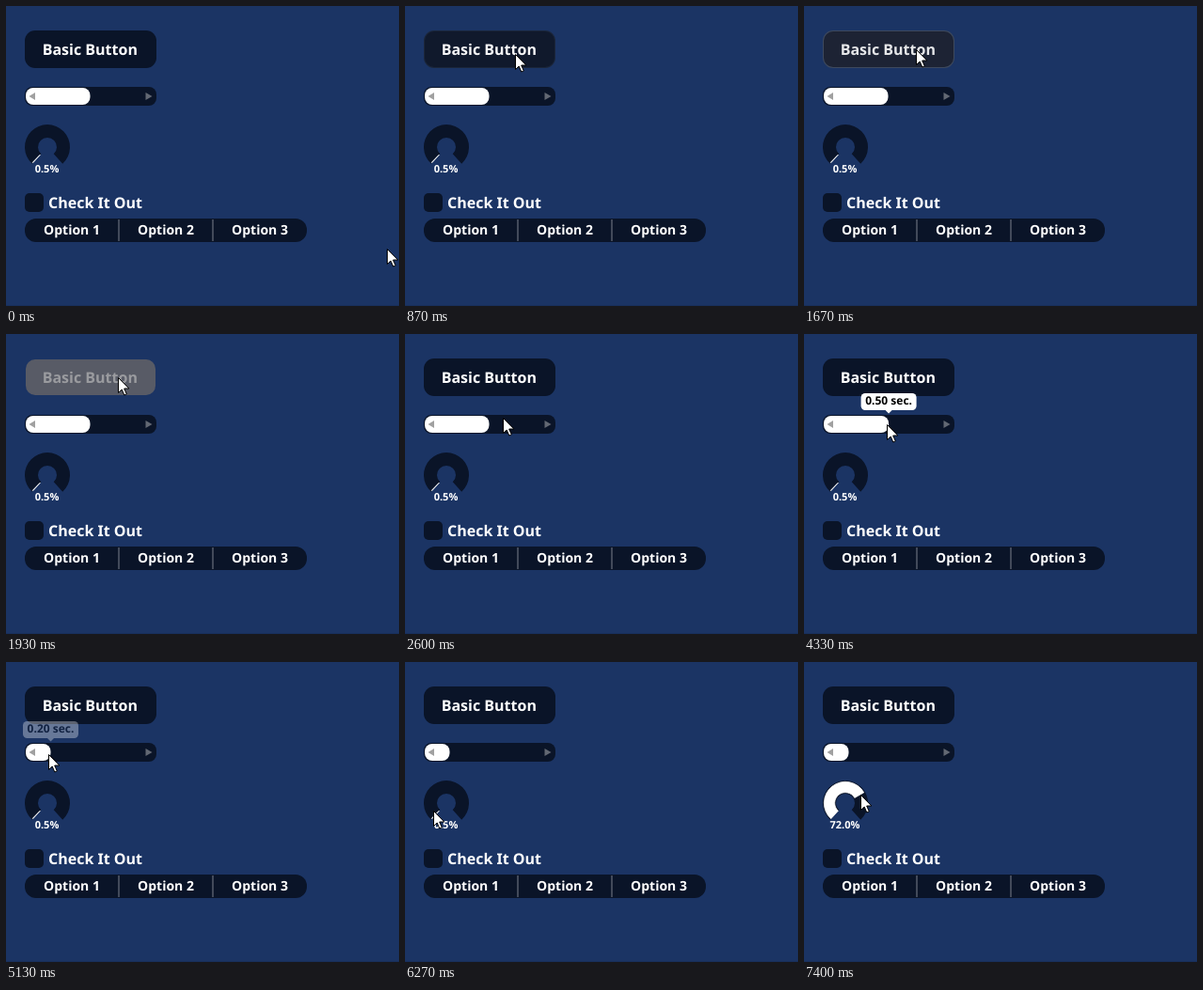
An HTML page for the animation above (8 s loop, 418x319 px).

```html
<!DOCTYPE html>
<html lang="en">
<head>
<meta charset="utf-8">
<title>Widget demo</title>
<style>
  html, body { margin: 0; width: 100%; height: 100%; overflow: hidden; background: #1b3464; }
  svg { display: block; width: 418px; height: 319px; }
  text { font: 700 16px "Noto Sans", "Open Sans", sans-serif; fill: #fff; text-rendering: geometricPrecision; }
  .mid { text-anchor: middle; }
  .dark { fill: #0a1428; }
  .tab { font-size: 14px; }
  .percent { font-size: 11px; }
  .tip { font-size: 12px; fill: #000; }
</style>
</head>
<body>
<svg viewBox="0 0 418 319">
  <rect width="418" height="319" fill="#1b3464"/>
  <rect y="318" width="418" height="1" fill="#182f5b"/>

  <rect id="edge" x="20" y="26" width="140" height="40" rx="11"/>
  <rect id="face" x="21" y="27" width="138" height="38" rx="10"/>
  <text id="label" class="mid" x="89.3" y="52">Basic Button</text>

  <rect class="dark" x="20" y="86" width="140" height="20" rx="8"/>
  <rect id="fill" x="21" y="87" height="18" rx="8" fill="#fff"/>
  <path d="M24.5 96l6.5-4v8z" fill="#a0a0a0"/>
  <path d="M155.5 96l-7-4v8z" fill="#626873"/>

  <path id="ring" class="dark"/>
  <path id="arc" fill="#fff" stroke="#fff" stroke-width=".7"/>
  <text id="percent" class="percent mid" x="43.5" y="177"></text>

  <rect class="dark" x="20" y="199" width="20" height="20" rx="5"/>
  <text x="45" y="215">Check It Out</text>

  <rect class="dark" x="20" y="226" width="300" height="25" rx="12"/>
  <path d="M120 227v23M220 227v23" stroke="#7a808c"/>
  <text class="tab mid" x="70" y="243">Option 1</text>
  <text class="tab mid" x="170" y="243">Option 2</text>
  <text class="tab mid" x="270" y="243">Option 3</text>

  <g id="bubble">
    <rect x="-29.5" y="63" width="59" height="18" rx="4.5" fill="#fff"/>
    <path d="M-3.500 81h7L0 84.500z" fill="#fff"/>
    <text id="seconds" class="tip mid" y="75"></text>
  </g>

  <path id="cursor" d="M.5.5v16l3.700-3.500 2.600 6 2.500-1.100-2.600-5.900h5.100z" fill="#fff" stroke="#000"/>
</svg>
<script>
const LOOP = 8000, STEP = 1000 / 15;
const el = id => document.getElementById(id);
const lerp = (a, b, k) => a + (b - a) * k;
const mix = (a, b, k) => a.map((v, i) => lerp(v, b[i], k));
const ramp = (t, from, to) => Math.min(1, Math.max(0, (t - from) / (to - from)));
const easeOut = k => 1 - (1 - k) ** 2.4;
// Fades in after `from` and out after `to`.
const during = (t, from, to, fade = 200) => ramp(t, from, from + fade) - ramp(t, to, to + fade);

// Each glide: start, end, and where the pointer arrives.
const GLIDES = [
  [0, 533, [98, 111]], [600, 1000, [119, 46]],
  [2330, 2530, [106, 118]], [2530, 2800, [102, 62]], [2870, 3333, [87, 95]],
  [3430, 3733, [120, 95]], [3800, 4000, [130, 95]], [4200, 4733, [45, 98]],
  [5533, 6000, [22, 148]], [6000, 6267, [30, 158]]
];
const pointer = t => GLIDES.reduce(
  (spot, [from, to, goal]) => mix(spot, goal, easeOut(ramp(t, from, to))), [405, 258]);

// Button colours at rest, hovered and pressed.
const FACE = [[10, 20, 40], [28, 34, 51], [88, 91, 102]];
const EDGE = [[10, 20, 40], [62, 73, 93], [27, 52, 100]];
const LABEL = [[255, 255, 255], [231, 232, 234], [154, 155, 159]];
const shade = ([rest, over, down], hover, press) =>
  `rgb(${mix(mix(rest, over, hover), down, press).map(Math.round)})`;

const knobAngle = percent => 4.8 * percent / 100 - 2.4 - Math.PI / 2;
const polar = (r, angle) => [44 + r * Math.cos(angle), 150 + r * Math.sin(angle)];

function sector(outer, inner, percent) {
  const from = knobAngle(0), to = knobAngle(percent);
  const large = to - from > Math.PI ? 1 : 0;
  return `M${polar(outer, from)}A${outer} ${outer} 0 ${large} 1 ${polar(outer, to)}` +
    `L${polar(inner, to)}A${inner} ${inner} 0 ${large} 0 ${polar(inner, from)}Z`;
}

function drawButton(t) {
  const hover = during(t, 800, 2400) + during(t, 2650, 2900);
  const press = during(t, 1130, 1400, 270) + during(t, 1670, 2070, 260);
  el('face').setAttribute('fill', shade(FACE, hover, press));
  el('edge').setAttribute('fill', shade(EDGE, hover, press));
  el('label').style.fill = shade(LABEL, hover, press);
}

// The slider follows the pointer while it is dragged.
function drawSlider(t) {
  const end = pointer(Math.min(Math.max(t, 3400), 4733))[0] + 2.5;
  el('fill').setAttribute('width', end - 21);
  el('bubble').setAttribute('transform', `translate(${end})`);
  el('bubble').setAttribute('opacity', during(t, 3400, 5000));
  el('seconds').textContent = ((end - 20) / 140).toFixed(2) + ' sec.';
}

function drawKnob(percent) {
  el('arc').setAttribute('d', sector(22.7, 11.3, percent));
  el('percent').textContent = percent.toFixed(1) + '%';
}

function draw(t) {
  const percent = .5 + 73.5 * ramp(t, 6400, 6600) - 62 * ramp(t, 6600, 6800) + 60 * ramp(t, 7133, 7400);
  drawButton(t);
  drawSlider(t);
  drawKnob(percent);
  const spot = t > 6433 ? polar(18, knobAngle(percent)) : pointer(t);
  el('cursor').setAttribute('transform', `translate(${spot.map(Math.round)})`);
}

el('ring').setAttribute('d', sector(24, 10, 100));

const start = performance.now();
function frame() {
  const t = (performance.now() - start) % LOOP;
  draw(Math.floor((t + 3.4) / STEP) * STEP);
  requestAnimationFrame(frame);
}
frame();
</script>
</body>
</html>
```
